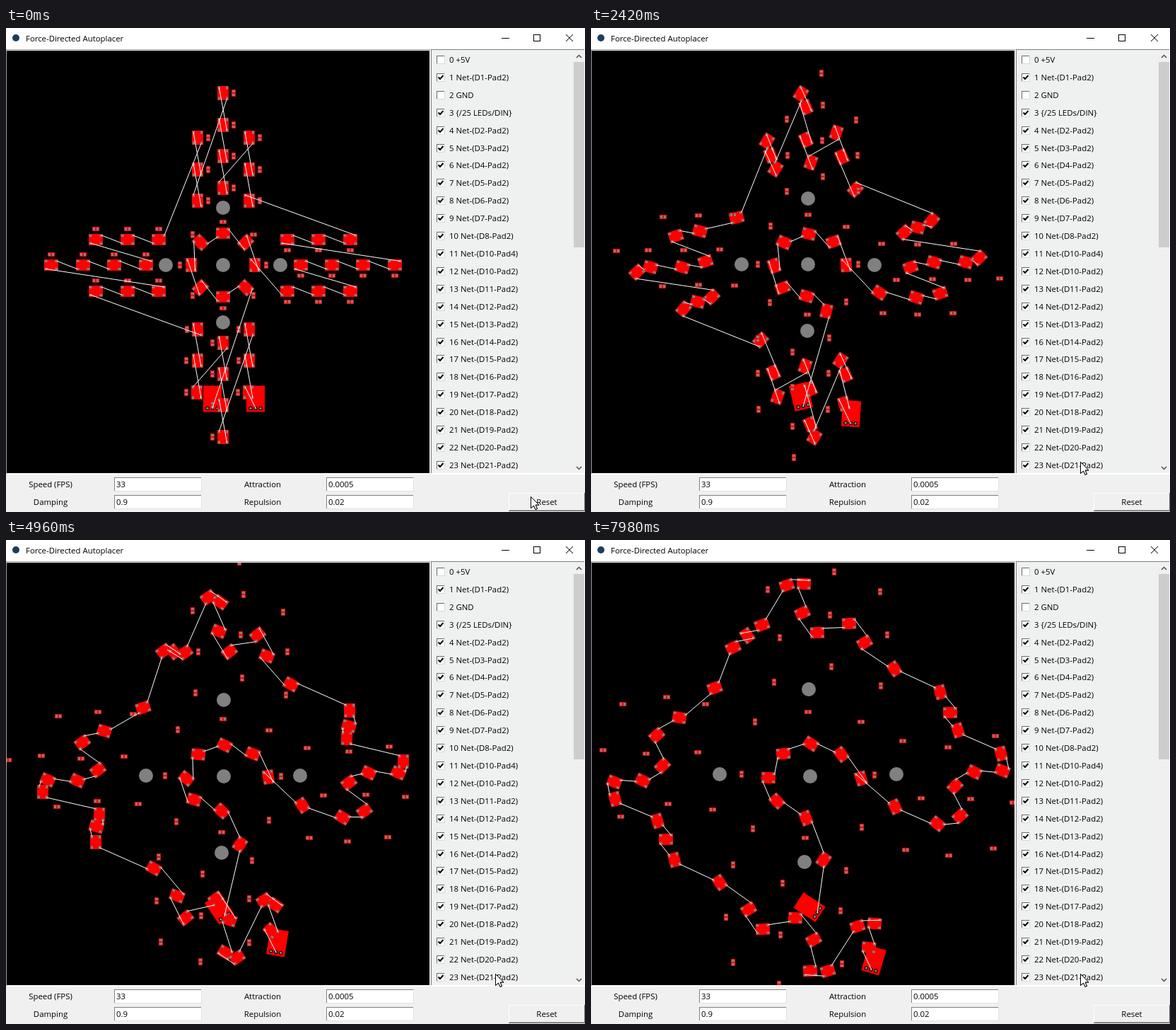
Animation of 819 by 684 pixels, one loop 8 s. Source, as an HTML page with a canvas:

```html
<!DOCTYPE html>
<html>
<head>
<meta charset="utf-8">
<style>
html, body { margin: 0; width: 100%; height: 100%; overflow: hidden; background: #f0f0f0; }
canvas { display: block; }
</style>
</head>
<body>
<canvas width="819" height="684"></canvas>
<script>
const g = document.querySelector('canvas').getContext('2d');
const LOOP = 8000, STEP = 101, STEPS = 80, SUBSTEPS = 3;
const CX = 307, CY = 335, RAD = Math.PI / 180;
const RED = '#f00', GREY = '#808080';

// Force strengths, given as the speeds they lead to once damping balances them.
const REPEL = 32, ATTRACT = 0.09, TWIST = 0.00038, DAMPING = 0.9;

const rotate = (x, y, a) => [x * Math.cos(a) - y * Math.sin(a), x * Math.sin(a) + y * Math.cos(a)];
const mix = (a, b, p) => a + (b - a) * p;

// Board: a ring of eight LEDs, four arms of ten, a capacitor beside each LED.
const parts = [];
function add(kind, [x, y], a = 0) {
  const part = { kind, x: CX + x, y: CY + y, a, vx: 0, vy: 0, va: 0 };
  parts.push(part);
  return part;
}

const plugIn = add('plug', [-15, 189]), plugOut = add('plug', [46, 189]);
const chain = [plugIn];

add('hole', [0, 0]);
for (let i = 0; i < 4; i++) add('hole', rotate(81, 0, i * 90 * RAD));

for (let i = 1; i <= 8; i++) {
  const a = 45 * i * RAD;
  chain.push(add('led', rotate(45, 0, a), -a - 90 * RAD));
  add('cap', rotate(61, 0, a), [2, 6, 7].includes(i) ? 0 : 90 * RAD);
}

function addArm(turn) {
  const a = turn * 90 * RAD;
  const addRow = (count, start, side) => {
    for (let i = 0; i < count; i++) {
      const out = start + 44.4 * i;
      chain.push(add('led', rotate(out, side, -a), a));
      add('cap', rotate(out, side + 15, -a), turn % 2 * 90 * RAD);
    }
  };
  addRow(3, 91, 36.5);
  addRow(4, 109.5, 0);
  addRow(3, 91, -36.5);
}
for (let turn = 0; turn < 4; turn++) addArm(turn);
chain.push(plugOut);

// Output pad for side 1, input pad for side -1.
function pad(p, side) {
  const [x, y] = p.kind === 'plug' ? rotate(0, 13, p.a) : rotate(8 * side, -5.5 * side, p.a);
  return [p.x + x, p.y + y];
}

function pull(p, [px, py], dx, dy) {
  p.fx += ATTRACT * dx;
  p.fy += ATTRACT * dy;
  const inertia = p.kind === 'plug' ? 2.5 : 1;
  p.torque += TWIST / inertia * ((px - p.x) * dy - (py - p.y) * dx);
}

// All parts repel each other; each net line acts as a spring between two pads.
function simulate(dt) {
  for (const p of parts) p.fx = p.fy = p.torque = 0;
  parts.forEach((p, i) => {
    for (let j = 0; j < i; j++) {
      const q = parts[j], dx = p.x - q.x, dy = p.y - q.y;
      const k = REPEL / (dx * dx + dy * dy + 30);
      p.fx += k * dx;
      p.fy += k * dy;
      q.fx -= k * dx;
      q.fy -= k * dy;
    }
  });
  for (let i = 1; i < chain.length; i++) {
    const a = pad(chain[i - 1], 1), b = pad(chain[i], -1);
    const dx = b[0] - a[0], dy = b[1] - a[1];
    pull(chain[i - 1], a, dx, dy);
    pull(chain[i], b, -dx, -dy);
  }
  for (const p of parts) {
    p.vx = mix(p.fx, p.vx, DAMPING);
    p.vy = mix(p.fy, p.vy, DAMPING);
    p.va = mix(p.torque, p.va, DAMPING);
    p.x += p.vx * dt;
    p.y += p.vy * dt;
    p.a += p.va * dt;
  }
}

// The whole run is computed once, so every picture depends on the time alone.
const poses = [];
for (let n = 0; n < STEPS; n++) {
  poses.push({
    parts: parts.map(p => ({ ...p })),
    nets: chain.slice(1).map((p, i) => [pad(chain[i], 1), pad(p, -1)])
  });
  for (let i = 0; i < SUBSTEPS; i++) simulate(STEP / SUBSTEPS / 1000);
}

function rect(x, y, w, h, color) {
  g.fillStyle = color;
  g.fillRect(x, y, w, h);
}
function disc(x, y, r, color) {
  g.fillStyle = color;
  g.beginPath();
  g.arc(x, y, r, 0, 7);
  g.fill();
}
function path(points, color, width = 1) {
  g.strokeStyle = color;
  g.lineWidth = width;
  g.beginPath();
  points.forEach(p => g.lineTo(...p));
  g.stroke();
}
function text(str, x, y, align = 'left') {
  g.fillStyle = '#000';
  g.font = '11.4px "Open Sans", "Noto Sans", sans-serif';
  g.textAlign = align;
  g.fillText(str, x, y);
}
// Bevelled box: light and dark edges swap for raised or sunken.
function bevel(x, y, w, h, fill, topLeft, bottomRight) {
  rect(x, y, w, h, bottomRight);
  rect(x, y, w - 1, h - 1, topLeft);
  rect(x + 1, y + 1, w - 2, h - 2, fill);
}

const shapes = {
  hole() { disc(0, 0, 10, GREY); },
  plug() {
    rect(-13, -18.5, 26, 37, RED);
    for (const x of [-7, 0, 7]) {
      disc(x, 13.5, 2.8, '#000');
      disc(x, 13.5, 1.7, GREY);
    }
  },
  led() {
    rect(-10, -8, 20, 16, RED);
    for (const x of [-9.5, 5.5]) for (const y of [-7, 4]) rect(x, y, 4, 3, GREY);
  },
  cap() {
    rect(-5, -3, 10, 6, RED);
    rect(-4, -2, 3, 4, GREY);
    rect(1, -2, 3, 4, GREY);
  }
};

function drawBoard(pose) {
  g.save();
  g.beginPath();
  g.rect(1, 32, 598, 597);
  g.clip();
  rect(1, 32, 598, 597, '#000');
  for (const kind in shapes) {
    for (const p of pose.parts.filter(p => p.kind === kind)) {
      g.save();
      g.translate(Math.round(p.x), Math.round(p.y));
      g.rotate(p.a);
      shapes[kind]();
      g.restore();
    }
  }
  for (const net of pose.nets) path(net, '#fff');
  g.restore();
}

function netName(n) {
  const fixed = { 0: '+5V', 1: 'Net-(D1-Pad2)', 2: 'GND', 3: '{/25 LEDs/DIN}', 11: 'Net-(D10-Pad4)' };
  return n + ' ' + (fixed[n] || `Net-(D${n - 2}-Pad2)`);
}

function drawField(label, value, x, y) {
  text(label, x - 90, y + 4, 'center');
  bevel(x, y - 10, 124, 20, '#fff', '#808080', '#e3e3e3');
  text(value, x + 3, y + 4);
}

function drawWindow() {
  rect(0, 0, 819, 684, '#f0f0f0');
  rect(0, 0, 819, 30, '#fff');
  disc(14, 14, 5, '#1d3c5e');
  text('Force-Directed Autoplacer', 28, 19);
  path([[701, 14.5], [712, 14.5]], '#000');
  g.strokeRect(746.5, 9.5, 9, 9);
  path([[792, 9], [802, 19]], '#000');
  path([[802, 9], [792, 19]], '#000');

  rect(0, 30, 600, 1, '#a0a0a0');
  rect(0, 30, 1, 600, '#a0a0a0');
  bevel(601, 30, 218, 600, '#eff0f0', '#808080', '#fff');
  for (let n = 0; n < 24; n++) {
    const y = Math.round(45 + 24.91 * n);
    bevel(609, y - 6, 12, 12, '#fff', '#696969', '#d8d8d8');
    if (n !== 0 && n !== 2) path([[611.5, y - 0.5], [614, y + 2], [618.5, y - 3]], '#000', 2);
    text(netName(n), 627, y + 4);
  }
  rect(802, 31, 16, 598, '#f0f0f0');
  rect(803, 48, 15, 262, '#cdcdcd');
  path([[807, 42], [810.5, 38.5], [814, 42]], '#505050', 1.5);
  path([[807, 620], [810.5, 623.5], [814, 620]], '#505050', 1.5);

  rect(0, 630, 819, 1, '#fff');
  drawField('Speed (FPS)', '33', 153, 645);
  drawField('Damping', '0.9', 153, 670);
  drawField('Attraction', '0.0005', 453, 645);
  drawField('Repulsion', '0.02', 453, 670);
  bevel(711, 657, 108, 26, '#f0f0f0', '#fff', '#696969');
  rect(712, 681, 106, 1, '#a0a0a0');
  text('Reset', 765, 674, 'center');
}

function drawCursor(t) {
  const p = Math.min(1, Math.max(0, (t - 100) / 600)), k = p * p * (3 - 2 * p);
  const x = mix(742.5, 692.5, k), y = mix(662.5, 613.5, k);
  const arrow = [[0, 0], [0, 16], [4, 12.5], [6.5, 18], [9, 17], [6.5, 11.5], [11.5, 11.5], [0, 0]];
  path(arrow.map(([a, b]) => [x + a, y + b]), '#000');
  g.fillStyle = '#fff';
  g.fill();
  g.stroke();
}

function frame(now) {
  const n = Math.min(STEPS - 1, Math.floor((now % LOOP) / STEP));
  drawWindow();
  drawBoard(poses[n]);
  drawCursor(n * STEP);
  requestAnimationFrame(frame);
}
frame(0);
</script>
</body>
</html>
```
